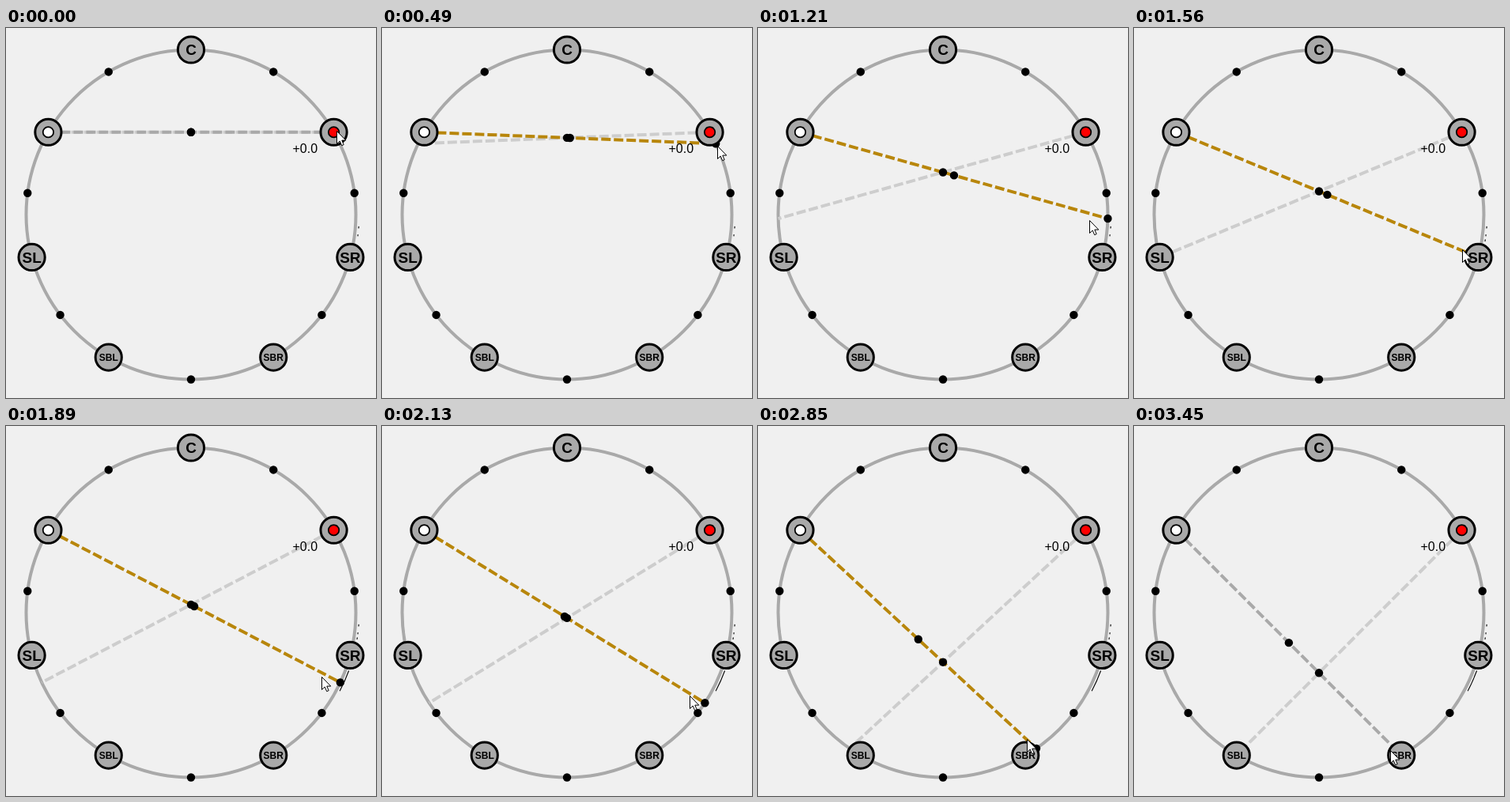
An HTML page that plays this animation: 468 by 468 pixels, repeating every 3.83 s.

```html
<!DOCTYPE html>
<html lang="en">
<head>
<meta charset="utf-8">
<title>Speaker ring</title>
<style>
  html, body { margin: 0; width: 100%; height: 100%; overflow: hidden; background: #f0f0f0; }
  svg { display: block; width: 468px; height: 468px; }
  text { font-family: "Liberation Sans", Arial, sans-serif; fill: #000; }
  .name { font-weight: bold; text-anchor: middle; }
  .chord { stroke-width: 4; stroke-dasharray: 12 4; }
  .trail { fill: none; stroke: #000; stroke-width: 1.1; }
</style>
</head>
<body>
<svg id="stage" viewBox="0 0 468 468"></svg>
<script>
const CX = 234, CY = 236, RADIUS = 208.5, LOOP = 3830, RELEASE = 3450;
const GREY = '#a9a9a9', LIGHT = '#cdcdcd', GOLD = '#b8860b';

const stepTimes = [
  250, 370, 490, 610, 730, 850, 970, 1090, 1210, 1330, 1450, 1560, 1660,
  1770, 1890, 2010, 2130, 2260, 2370, 2490, 2620, 2730, 2850, 2970, 3080
];
// Pointer path: step, x, y
const pointerPath = [
  [0, 418, 130], [2, 424, 149], [4, 428, 201], [6, 422, 219],
  [11, 415, 280], [16, 389, 341], [19, 364, 374], [24, 324, 410]
];

const stage = document.getElementById('stage');

function set(el, attrs) {
  for (const key in attrs) el.setAttribute(key, attrs[key]);
  return el;
}
function add(tag, attrs, content) {
  const el = set(document.createElementNS('http://www.w3.org/2000/svg', tag), attrs);
  if (content) el.textContent = content;
  return stage.appendChild(el);
}
function onRing(deg, r = RADIUS) {
  const a = deg * Math.PI / 180;
  return { x: CX + r * Math.cos(a), y: CY + r * Math.sin(a) };
}
const circle = (p, r, attrs) => add('circle', { cx: p.x, cy: p.y, r, ...attrs });
const dot = p => circle(p, 5.2, { fill: '#000' });
const moveDot = (el, x, y) => set(el, { cx: x, cy: y });
const moveLine = (el, a, b) => set(el, { x1: a.x, y1: a.y, x2: b.x, y2: b.y });

function trail(from, to) {
  const r = 212.7, a = onRing(from, r), b = onRing(to, r);
  return add('path', { class: 'trail', d: `M${a.x} ${a.y}A${r} ${r} 0 0 1 ${b.x} ${b.y}` });
}
function node(deg, label, size) {
  const p = onRing(deg);
  circle(p, 16.6, { fill: GREY, stroke: '#000', 'stroke-width': 3 });
  if (label) add('text', { class: 'name', x: p.x, y: p.y + size * 0.35, 'font-size': size }, label);
}

const left = onRing(210), right = onRing(-30);

circle({ x: CX, y: CY }, RADIUS, { fill: 'none', stroke: GREY, 'stroke-width': 4 });
trail(4, 4.7);
trail(6.8, 7.4);
const lateTrails = [[11, trail(8.5, 9.2)], [14, trail(20.2, 27.8)]];

const mirrorLine = add('line', { class: 'chord', stroke: LIGHT });
const mainLine = add('line', { class: 'chord' });
[-120, -60, -7.5, 187.5, 37.5, 142.5, 90].forEach(deg => dot(onRing(deg)));
const handle = dot(right), middle = dot(right), crossing = dot(right);

node(-90, 'C', 19);
node(210);
node(-30);
node(165, 'SL', 19);
node(15, 'SR', 19);
node(120, 'SBL', 12);
node(60, 'SBR', 12);
circle(left, 6.7, { fill: '#fff', stroke: '#000', 'stroke-width': 1.8 });
circle(right, 6.7, { fill: '#f00', stroke: '#000', 'stroke-width': 1.8 });
add('text', { x: 362.5, y: 158, 'font-size': 16 }, '+0.0');

const pointer = add('path', {
  d: 'M.5 .5V16.5L4.2 13L6.7 18.7L9.2 17.6L6.8 12.1H11.8Z',
  fill: '#fff', stroke: '#000', 'stroke-width': 1
});

function pointerAt(step) {
  const i = Math.max(1, pointerPath.findIndex(k => k[0] >= step));
  const [s0, x0, y0] = pointerPath[i - 1], [s1, x1, y1] = pointerPath[i];
  const f = (step - s0) / (s1 - s0);
  return { x: x0 + (x1 - x0) * f, y: y0 + (y1 - y0) * f };
}
// The handle follows the pointer and snaps to stops 22.5 degrees apart.
function handleAngle(p) {
  const deg = Math.atan2(p.y - CY, p.x - CX) * 180 / Math.PI - 0.9;
  const stop = Math.round((deg + 30) / 22.5) * 22.5 - 30;
  return Math.abs(deg - stop) < 2.7 ? stop : deg;
}

function render(time) {
  const step = stepTimes.filter(t => t <= time).length - 1;
  const cursor = pointerAt(Math.max(0, step));
  const end = onRing(handleAngle(cursor));
  const dragging = step >= 0 && time < RELEASE;

  moveLine(mainLine, left, end).setAttribute('stroke', dragging ? GOLD : GREY);
  moveLine(mirrorLine, right, { x: 2 * CX - end.x, y: end.y });
  moveDot(handle, end.x, end.y);
  moveDot(middle, (left.x + end.x) / 2, (left.y + end.y) / 2);
  moveDot(crossing, CX, left.y + (end.y - left.y) * (CX - left.x) / (end.x - left.x));
  for (const [from, el] of lateTrails) el.style.display = step >= from ? '' : 'none';
  set(pointer, { transform: `translate(${Math.round(cursor.x)} ${Math.round(cursor.y)})` });
}

const start = performance.now();
function tick() {
  render((performance.now() - start) % LOOP);
  requestAnimationFrame(tick);
}
tick();
</script>
</body>
</html>
```
